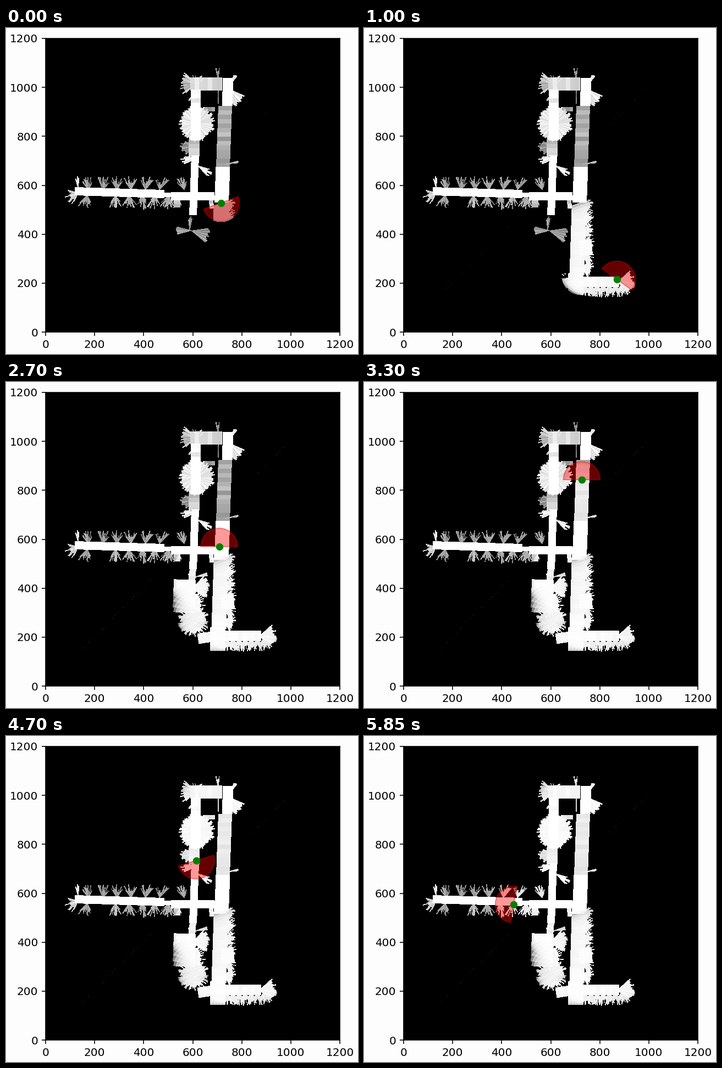
Write a matplotlib script that moves like this. It is 640 px wide and 594 px high and loops after 5900 ms.

```python
import matplotlib.pyplot as plt
import numpy as np
from matplotlib.animation import FuncAnimation
from matplotlib.patches import Wedge

W, H, DPI = 640, 594, 100
LEFT, TOP, SIDE = 72, 19, 535
FRAMES, STEP = 118, 50
WORLD, RANGE, WALL = 1200, 75, 676
SCALE = SIDE / WORLD

# key poses: time in ms, x, y, heading in degrees
ROUTE = np.array([
    (0, 715, 528, -70), (620, 720, 230, -80), (900, 862, 212, 0),
    (1000, 870, 215, 54), (1130, 850, 214, 180), (1560, 650, 215, 170),
    (1800, 576, 338, 60), (2130, 600, 480, 90), (2400, 640, 556, 10),
    (2700, 708, 570, 90), (3600, 736, 980, 90), (3900, 685, 1004, 189),
    (4150, 612, 990, 268), (4700, 613.5, 733.5, 287),
    (5200, 606, 560, 260), (5850, 449, 554, 170),
]).T

ROW, COL = np.mgrid[:SIDE, :SIDE] + 0.5
PX, PY = COL + LEFT, ROW + TOP
WX, WY = COL / SCALE, (SIDE - ROW) / SCALE


def pose(t):
    return [np.interp(t, ROUTE[0], row) for row in ROUTE[1:]]


class Grid:
    """Brightness of the map, drawn in stage pixels from halls and bursts."""

    def __init__(self, revisited):
        self.fade = 0.25 if revisited else 1
        self.img = np.zeros((SIDE, SIDE))
        self.rng = np.random.default_rng(7)

    def paint(self, mask, shade):
        lifted = 1 - self.fade * (1 - shade)
        self.img = np.where(mask, np.maximum(self.img, lifted), self.img)

    def hall(self, x0, y0, x1, y1, width, dim=1.0):
        """Straight corridor with cross stripes between dim and dim + 0.2."""
        length = np.hypot(x1 - x0, y1 - y0)
        ux, uy = (x1 - x0) / length, (y1 - y0) / length
        along = (PX - x0) * ux + (PY - y0) * uy
        across = (PX - x0) * uy - (PY - y0) * ux
        shades = self.rng.uniform(dim, min(dim + 0.2, 1), int(length / 8) + 1)
        stripe = np.clip(along / 8, 0, len(shades) - 1).astype(int)
        inside = (along >= 0) & (along <= length) & (abs(across) <= width / 2)
        self.paint(inside, shades[stripe])

    def burst(self, x, y, r, mid, half, dim=0.75, short=0.65):
        """Ragged fan of touching rays around the direction mid."""
        n = max(int(half / 2.2), 4)
        reach = r * self.rng.uniform(short, 1, n)
        shades = self.rng.uniform(dim, min(dim + 0.25, 1), n)
        angle = np.degrees(np.arctan2(y - PY, PX - x))
        turn = (angle - mid + 180) % 360 - 180
        ray = np.clip((turn + half) / (2 * half) * n, 0, n - 1).astype(int)
        near = np.hypot(PX - x, PY - y) < reach[ray]
        self.paint(near & (abs(turn) <= half), shades[ray])

    def west(self):
        self.hall(125, 297.5, 288, 302.5, 15)
        self.hall(286, 304, 302, 304, 8)
        self.hall(300, 306.5, 379, 306.5, 14)
        for x in (*np.linspace(150, 279, 6), 324):
            self.burst(x, 296, 27, self.rng.uniform(75, 105), 32, 0.5, 0.4)
        for x in (148, *np.linspace(199, 296, 5), 312):
            self.burst(x, 304, 27, self.rng.uniform(255, 280), 36, 0.55, 0.4)
        self.burst(132, 297, 30, 97, 9, 0.8)
        self.burst(132, 300, 26, 205, 40, 0.7, 0.4)
        self.hall(373, 312, 374, 329, 8, 0.75)
        self.hall(311, 312, 311, 327, 11, 0.7)

    def middle(self):
        self.hall(344, 232, 340, 341, 14)
        self.hall(342, 203, 342, 234, 20, 0.7)
        self.burst(346, 214, 31, 190, 32, 0.5)
        self.burst(350, 236, 36, 190, 16, 0.85)
        self.burst(347, 250, 32, -32, 16, 0.75)
        self.burst(334, 372, 30, 88, 9, 0.5)
        self.burst(339, 369, 31, 180, 15, 0.5, 0.9)
        self.burst(336, 369, 36, -16, 24, 0.5, 0.85)

    def north(self):
        self.burst(347, 174, 34, 0, 180, 0.85, 0.78)
        self.hall(345, 136, 345, 205, 17)
        self.hall(358, 148, 380, 148, 8, 0.5)
        self.hall(345, 112, 345, 138, 17, 0.85)
        self.burst(344, 114, 22, 258, 24, 0.75)
        self.hall(335, 102, 393, 102, 23, 0.78)
        self.burst(347, 101, 32, 180, 42, 0.65, 0.75)
        self.burst(347, 104, 20, 100, 60, 0.7)
        self.burst(386, 98, 26, 93, 9, 0.5)
        self.hall(386, 110, 386, 138, 2, 0.45)

    def east(self):
        self.hall(404, 91, 402, 142, 19)
        self.burst(406, 106, 24, 60, 9, 0.85, 0.9)
        self.burst(403, 110, 36, -47, 24, 0.8, 0.85)
        self.hall(398.5, 142, 394.5, 253, 25, 0.58)
        self.hall(394.5, 253, 392, 318, 26)
        self.burst(396, 249, 28, 11, 5, 0.65, 0.9)

    def south(self):
        self.hall(392, 300, 387, 450, 27, 0.9)
        self.hall(402, 386, 404, 414, 24)
        for y in np.linspace(324, 436, 6):
            self.burst(397, y, 22, -10, 55, 0.75, 0.6)
        self.hall(385, 446, 385, 490, 28, 0.95)
        self.hall(398, 463, 464, 462, 19, 0.9)
        for x in np.linspace(390, 468, 8):
            self.burst(x, 466, 26, 272, 34, 0.65, 0.5)
        self.burst(460, 463, 34, 0, 42, 0.75, 0.75)
        self.burst(385, 464, 28, 180, 14, 0.7)
        self.hall(349, 468, 374, 464, 19, 0.85)

    def room(self):
        self.hall(325, 360, 323, 420, 40)
        self.burst(338, 376, 34, 5, 42, 0.85, 0.8)
        self.burst(334, 403, 29, 0, 100, 0.85)
        self.burst(341, 435, 30, 0, 180, 0.8)
        self.burst(340, 438, 33, 200, 20, 0.8)
        self.hall(340, 338, 338, 364, 12, 0.7)
        self.burst(340, 356, 28, 12, 8, 0.4, 0.9)


def build(complete):
    g = Grid(complete)
    for part in (g.west, g.middle, g.north, g.east):
        part()
    if complete:
        g.south()
        g.room()
    return g.img


def explore():
    """Maps for all steps: each sweep pulls its half disc to the final shade."""
    first, final = build(False), build(True)
    rng = np.random.default_rng(3)
    along = np.concatenate([rng.uniform(0, 0.34, 30), rng.uniform(0.8, 1, 14)])
    born = rng.uniform(-250, 2400, along.size)
    walled = (WY > 240) & (WY < 920) & (abs(WY - 560) > 45)
    gap = np.ones((SIDE, SIDE))
    maps = []
    for t in np.arange(FRAMES) * STEP:
        for s in (t - STEP / 2, t):
            x, y, h = pose(s)
            dx, dy, a = WX - x, WY - y, np.radians(h)
            seen = (np.hypot(dx, dy) < RANGE + 3) & (dx * np.cos(a) + dy * np.sin(a) > 0)
            seen &= ~(walled & ((WX < WALL) != (x < WALL)))
            gap[seen] *= 0.5
        img = final + (first - final) * gap
        on = along[born <= t]
        img[(468 - 381 * on).astype(int), (66 + 380 * on).astype(int)] = 0.17
        maps.append((img * 255).astype(np.uint8))
    return maps


maps = explore()

fig = plt.figure(figsize=(W / DPI, H / DPI), dpi=DPI, facecolor="#fdfdfd")
ax = fig.add_axes([LEFT / W, (H - TOP - SIDE) / H, SIDE / W, SIDE / H])
view = ax.imshow(maps[0], cmap="gray", vmin=0, vmax=255,
                 extent=(0, WORLD, 0, WORLD), interpolation="nearest")
ticks = range(0, WORLD + 1, 200)
ax.set_xticks(ticks)
ax.set_yticks(ticks)
ax.tick_params(labelsize=14.4, labelfontfamily="DejaVu Sans",
               length=5, pad=5, width=1.15)
for spine in ax.spines.values():
    spine.set_linewidth(1.15)
    spine.set_snap(False)

scan = ax.add_patch(Wedge((0, 0), RANGE, 0, 180, fc=(1, 0, 0, 0.4),
                          ec=(0.85, 0, 0, 0.4), lw=1.4, zorder=2))
robot, = ax.plot([0], [0], "o", color="green", ms=8.6, zorder=3)
ax.set(xlim=(0, WORLD), ylim=(0, WORLD))


def update(k):
    x, y, h = pose(k * STEP)
    view.set_data(maps[k])
    scan.set_center((x, y))
    scan.set_theta1(h - 90)
    scan.set_theta2(h + 90)
    robot.set_data([x], [y])
    return view, scan, robot


anim = FuncAnimation(fig, update, frames=FRAMES, interval=STEP,
                     repeat=True, repeat_delay=0)
plt.show()
```
